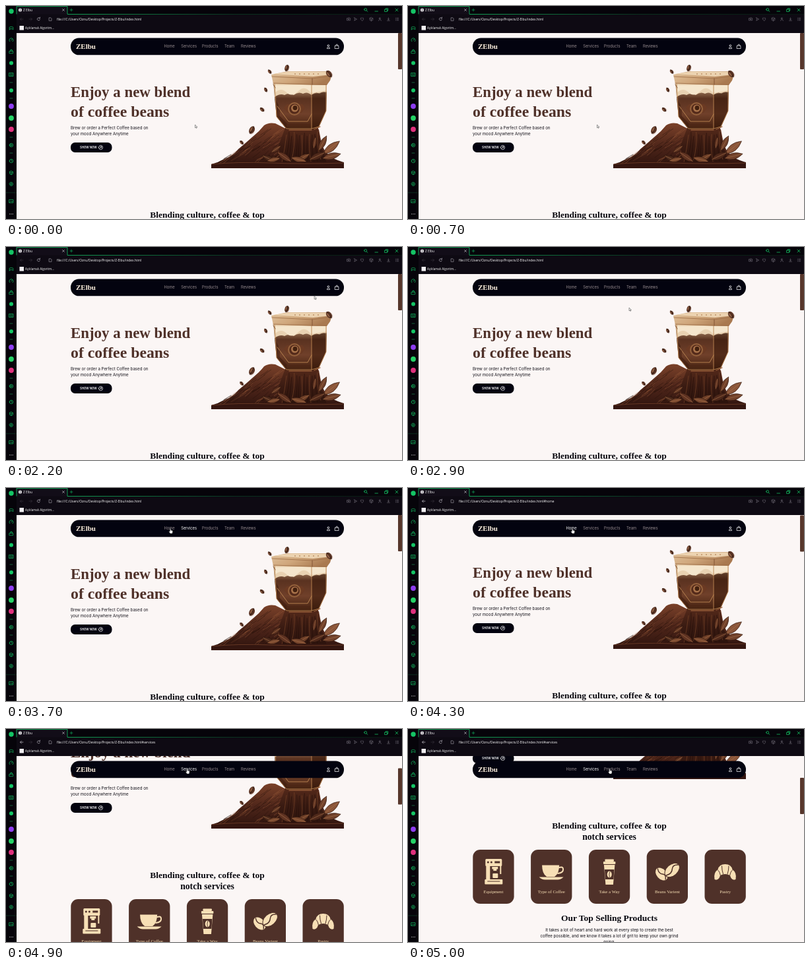
An HTML page for the animation above (5100 ms loop, 600x323 px).

```html
<!DOCTYPE html>
<html lang="en">
<head>
<meta charset="utf-8">
<title>Coffee shop page</title>
<style>
  html, body { margin: 0; width: 100%; height: 100%; overflow: hidden; background: #fbf6f5; }
  svg { display: block; width: 100vw; height: 100vh; }
  text { white-space: pre; }
  .serif { font-family: "Liberation Serif", serif; }
  .bold { font-weight: 700; }
  .sans { font-family: Inter, sans-serif; }
  .ui { font-family: "Open Sans", sans-serif; fill: #fff; }
  .line { fill: none; stroke-linecap: round; stroke-linejoin: round; }
</style>
</head>
<body>
<svg id="stage" viewBox="0 0 600 323" xmlns="http://www.w3.org/2000/svg"></svg>
<script>
const LOOP = 5100, STEP = 100;
const INK = '#03030f', BROWN = '#4f3129', CREAM = '#f7dfb5', GREEN = '#14c565';

let seed = 7;
const rnd = () => (seed = (seed * 16807) % 2147483647) / 2147483647;

const text = (x, y, size, str, cls, attrs = '') =>
  `<text x="${x}" y="${y}" font-size="${size}" class="${cls}" ${attrs}>${str}</text>`;
const path = (d, fill, attrs = '') => `<path d="${d}" fill="${fill}" ${attrs}/>`;
const line = (d, color, w = 0.7, attrs = '') =>
  `<path class="line" d="${d}" stroke="${color}" stroke-width="${w}" ${attrs}/>`;
const rect = (x, y, w, h, fill, r = 0) =>
  `<rect x="${x}" y="${y}" width="${w}" height="${h}" rx="${r}" fill="${fill}"/>`;
const dot = (x, y, r, fill) => `<circle cx="${x}" cy="${y}" r="${r}" fill="${fill}"/>`;
const ring = (x, y, r) => `M${x - r} ${y}a${r} ${r} 0 1 1 ${2 * r} 0a${r} ${r} 0 1 1 ${-2 * r} 0z`;
const box = (x, y, w, h) => `M${x} ${y}h${w}v${h}h${-w}z`;
const at = (x, y, body, more = '') => `<g transform="translate(${x} ${y}) ${more}">${body}</g>`;
const cube = 'M0 -3L2.7 -1.5V1.5L0 3L-2.7 1.5V-1.5zM-2.7 -1.5L0 0L2.7 -1.5M0 0V3';

function gradient(id, stops, dir = 'x2="0" y2="1"') {
  const list = stops.map((c, i) => `<stop offset="${i / (stops.length - 1)}" stop-color="${c}"/>`);
  return `<linearGradient id="${id}" ${dir}>${list.join('')}</linearGradient>`;
}

// Hero illustration
const bean = (x, y, size, turn) => at(x, y,
  `<ellipse cx=".7" cy="1" rx="${size * 0.68}" ry="${size}" fill="#cdb9b0" opacity=".6"/>` +
  `<ellipse rx="${size * 0.66}" ry="${size}" fill="#5a3424"/>` +
  `<ellipse cx="-.8" cy="-.6" rx="${size * 0.3}" ry="${size * 0.6}" fill="#8a5a40"/>` +
  line(`M0 ${-size}Q1.4 0 0 ${size}`, '#24110b', 0.8), `rotate(${turn})`);

const leaf = (x, y, len, turn, fill) => at(x, y,
  path(`M0 0Q${len * 0.45} ${-len * 0.34} ${len} 0Q${len * 0.45} ${len * 0.34} 0 0z`, fill, 'stroke="#32180f" stroke-width=".6"') +
  line(`M1 0H${len - 2}`, '#b27a50', 0.5), `rotate(${turn})`);

function hero() {
  let s = path('M311 246V240Q322 237 331 232Q344 227 352 217Q364 207 374 198Q384 190 391 181Q398 176 408 178L426 187H474L478 208Q484 230 512 237V246z', 'url(#rock)');
  for (let i = 0; i < 80; i++) {
    const x = 334 + rnd() * 90;
    const top = Math.max(182, 242 - (x - 313) * 0.72);
    const y = top + 3 + rnd() * (229 - top);
    s += line(`M${x.toFixed(1)} ${y.toFixed(1)}q-4 ${(1 + rnd() * 4).toFixed(1)} -11 ${(6 + rnd() * 4).toFixed(1)}`,
      i % 3 ? '#26100b' : '#9a5c3a', 0.8, 'opacity=".55"');
  }
  s += path('M423 185H473L477 210L486 238H420L412 214z', 'url(#neck)');
  for (let i = 0; i < 13; i++) {
    s += line(`M${425 + i * 3.9} ${190 + rnd() * 8}q${2 - rnd() * 5} 22 ${i - 7} 42`, i % 3 ? '#220e09' : '#7d4729', 0.9, 'opacity=".7"');
  }
  const leaves = [
    [474, 219, 25, -62, '#6f402a'], [481, 224, 31, -38, '#8a5539'], [480, 231, 28, -14, '#70412b'],
    [466, 216, 18, -80, '#5b301f'], [460, 233, 26, -25, '#4f291b'], [440, 235, 23, -28, '#6d3e27'],
    [432, 236, 26, -145, '#5f3322'], [408, 236, 22, -155, '#4b291b'], [455, 236, 24, -165, '#78472d'],
    [402, 222, 18, -35, '#5f3522'], [396, 235, 20, -12, '#78472d']
  ];
  s += leaves.map(l => leaf(...l)).join('');
  s += path('M311 240Q350 235 400 237Q460 235 512 237V246H311z', '#341610') +
    line('M312 240Q350 236 400 238T511 238', '#6b3b26', 0.9);

  // Hopper
  s += path('M405 117H486L485 159L474 184L464 187H425L410 168z', 'url(#brew)') +
    path('M406 117H486V132Q480 128 475 133Q469 129 463 135Q456 129 450 133Q443 129 436 135Q428 131 422 135Q415 132 407 138z', '#e9d2b2') +
    path('M408 131Q417 123 425 131T443 129T462 132L485 128V120H408z', '#f5e6cd') +
    path('M463 134L486 130L485 159L474 184L464 187z', '#351609', 'opacity=".5"') +
    path('M407 140L413 150V166L425 178V187L410 168z', '#351609', 'opacity=".45"') +
    line('M407 118L410 168L425 186H463V119M463 186L474 183L485 159V120M411 152L428 175H457L463 164', '#bd8753', 0.9) +
    line('M414 157V167L427 180H460', '#4d2515', 1.2) +
    line('M429 188H463M467 187L476 183', '#935a37', 1.3);
  s += path('M421 154l5 -5h23l4 5l-5 8h-21z', '#6b3a23') +
    dot(437, 156, 10, '#93603b') + dot(437, 156, 7.8, '#542a1a') +
    dot(437.5, 155, 5.5, '#a9734a') + dot(438, 154.5, 3.4, '#43210f');
  s += path('M402 104L426 99H489L494 104L491 113L486 120L405 118z', 'url(#lid)') +
    path('M405 103L430 99.500H489L493 104L465 107z', '#ecd3b1') +
    line('M403 107L464 110L493 106M405 117L464 119L486 119', '#9b6b45', 0.8);
  for (let i = 0; i < 6; i++) s += dot(438 + i * 7, 103, 0.9, '#b98b61');
  s += line('M405 119L408 124M464 110V119', '#845535', 1);

  const beans = [[425.5, 94, 4.7, 18], [399.5, 99.5, 3.3, -35], [393.5, 127, 3.3, -25], [489.5, 103, 5.8, -38],
    [388, 157, 3.7, -45], [372.5, 188, 6, 28], [357, 207, 3.2, -42]];
  return s + beans.map(b => bean(...b)).join('');
}

// Service cards
const cardIcons = [
  rect(19, 14, 25, 11, CREAM, 1.5) + rect(20, 25, 6, 20, CREAM) + rect(18, 45, 27, 7.5, CREAM, 1) +
    rect(29, 26, 9, 3.5, CREAM) + rect(31, 29, 5, 3, CREAM) + rect(30, 36, 8, 7, CREAM, 1) + rect(41, 25, 2, 12, CREAM) +
    dot(23, 19, 1.5, BROWN) + dot(28, 19, 1.5, BROWN) + rect(33, 17.5, 8, 3, BROWN) + rect(22, 47.5, 19, 1, BROWN),
  path('M17 23.5h26q0 13 -7 17.5h-12q-7 -4.5 -7 -17.5z', CREAM) +
    line('M43 27q6 -2 6 3t-8 6', CREAM, 2) + path('M12.5 41.5h37q-4 4 -9 4h-19q-5 0 -9 -4z', CREAM),
  rect(24.5, 14.5, 13.5, 3.5, CREAM, 1) + rect(22, 18, 18.5, 4, CREAM, 1) + path('M23 23h16.5l-2.5 30h-11.5z', CREAM) +
    path('M24 30h14.5l-1 15h-12.5z', BROWN) +
    `<ellipse cx="31.3" cy="37.5" rx="3.5" ry="5" fill="${CREAM}"/>` + line('M32 33q-2 4 -.5 9', BROWN, 0.9),
  at(22.5, 37, `<ellipse rx="11" ry="7.5" fill="${CREAM}"/>` + line('M-10 -1Q-3 3 1 -1T10 1', BROWN, 1.4), 'rotate(48)') +
    at(38.5, 31, `<ellipse rx="13" ry="8.5" fill="${CREAM}" stroke="${BROWN}"/>` + line('M-12 0Q-4 4 1 -1T12 0', BROWN, 1.5), 'rotate(-42)'),
  path('M15 45q-2 -10 5 -15q2 -8 11 -8t11 8q7 5 5 15q-4 2 -7 -2q-1 -6 -9 -6t-9 6q-3 4 -7 2z', CREAM) +
    line('M20 31q3 2 4 9M26 25q0 6 2 12M36.5 25q0 6 -2 12M42 31q-3 2 -4 9', BROWN, 1)
];
const cardNames = ['Equipment', 'Type of Coffee', 'Take a Way', 'Beans Varient', 'Pastry'];
const cards = () => cardNames.map((name, i) => at(98.3 + i * 87.8, 353,
  rect(0, 0, 62.3, 82, BROWN, 11) + cardIcons[i] +
  text(31.2, 66, 6.8, name, 'serif', `fill="${CREAM}" text-anchor="middle"`))).join('');

const mid = (y, size, str, cls) => text(305, y, size, str, cls, 'fill="#090910" text-anchor="middle"');

const page = () =>
  text(98, 138, 22.9, 'Enjoy a new blend', 'serif bold', `fill="${BROWN}"`) +
  text(98, 167.5, 23.8, 'of coffee beans', 'serif bold', `fill="${BROWN}"`) +
  text(98, 186.5, 6.15, 'Brew or order a Perfect Coffee based on', 'sans', 'fill="#15131b"') +
  text(98, 195.5, 6.15, 'your mood Anywhere Anytime', 'sans', 'fill="#15131b"') +
  rect(98, 207, 62.5, 15, INK, 6.5) +
  text(112, 216, 4.3, 'SHOW NOW', 'sans', 'fill="#fff" font-weight="600"') +
  line(ring(143.5, 214.5, 3.1) + 'M142.3 215.8L144.8 213.2M142.8 213.2H144.8V215.2', '#fff', 0.7) +
  hero() +
  mid(321, 13.5, 'Blending culture, coffee &amp; top', 'serif bold') +
  mid(337.5, 13.7, 'notch services', 'serif bold') +
  cards() +
  mid(460.5, 13.5, 'Our Top Selling Products', 'serif bold') +
  mid(476.8, 6.1, 'It takes a lot of heart and hard work at every step to create the best', 'sans') +
  mid(486, 6.1, 'coffee possible, and we know it takes a lot of grit to keep your own grind', 'sans') +
  mid(495.2, 6.1, 'going.', 'sans');

// Sticky bar
const links = [['Home', 239.5], ['Services', 265.2], ['Products', 297], ['Team', 331], ['Reviews', 356]];
const bar = () => rect(98, 48.5, 414, 25.8, INK, 12.5) +
  text(106, 65, 11, 'ZElbu', 'serif bold', 'fill="#fbeedd"') +
  links.map(([name, x]) => text(x, 63.3, 5.8, name, 'sans link')).join('') +
  line(ring(488.5, 60, 1.3) + 'M486.4 64.2q0 -2 2.1 -2t2.1 2z', '#fff', 0.7) +
  line('M498.8 60h5l.3 4.5h-5.6zM500 60q0 -2 1.3 -2t1.3 2', '#fff', 0.7);

// Browser frame
function browser() {
  const g = (d, w = 0.75) => line(d, GREEN, w);
  const grey = d => line(d, '#9a95a1', 0.5);
  const gat = (x, y, d) => at(x, y, g(d), 'scale(.92)');
  const small = (x, d) => at(x, 20, grey(d), 'scale(.88)');
  let s = rect(0, 0, 600, 41, '#06040a') + rect(0, 0, 16, 323, '#06040a') + rect(16, 1, 77, 12, '#120d18') +
    rect(16, 12.5, 584, 28.5, '#0e0a13');
  s += rect(93, 12, 507, 0.8, 'url(#edge)') + line('M16 12V.6H93V12', GREEN, 0.8);

  // Side icons
  s += dot(8, 8, 3.7, GREEN) + dot(8, 86.5, 3, GREEN) + dot(8, 128, 3, GREEN) +
    dot(8, 152, 3.9, '#8e3df2') + dot(8, 170, 3.9, '#25d366') + dot(8, 187, 3.9, '#e0307d');
  s += gat(8, 34, 'M-3 2V-1.5Q-3 -2.5 -2 -2.5H2Q3 -2.5 3 -1.5V2L1.5 .7H-1.5z') +
    gat(8, 51.5, 'M-2.5 2.5A3.3 3.3 0 1 1 2.5 2.5M0 .5L1.5 -1.5') +
    gat(8, 69, 'M-3 -.5H3V3H-3zM-1.5 -.5V-2.5H1.5V-.5M0 -3.5V-2.5') +
    gat(8, 104, box(-3.3, -2.7, 6.6, 5.4) + 'M-2 -1H0M-2 1H2M1.5 -1H2') +
    gat(8, 211, ring(0, 0, 3) + 'M-.8 -1.3L1.5 0L-.8 1.3z') +
    gat(8, 235, ring(0, 0, 3) + 'M0 -1.8V0L1.3 .8') + gat(8, 253, cube) +
    gat(8, 270, ring(0, 0, 1.1) + 'M-1.3 -2.8H1.3L3 0L1.3 2.8H-1.3L-3 0z') +
    gat(8, 296, box(-3.2, -2.5, 6.4, 5) + 'M-2.5 1.5L-.5 -.5L1 1L2.5 0');
  s += [116, 140, 199, 223].map(y => line(`M6 ${y}H10`, '#187747', 0.8)).join('') + line('M0 283H15.5', '#0c5a32', 0.5);
  s += [5.7, 8, 10.3].map(x => dot(x, 315.3, 0.6, '#ddd')).join('');

  // Tabs and window buttons
  s += dot(21.5, 6, 2.6, '#f0eef2') + line('M19.5 5H23.5M19.5 7H23.5M21.5 3.6V8.4', '#4b4650', 0.4) +
    text(26, 7.9, 4.85, 'Z Elbu', 'ui') + line('M85.5 4.5L88.5 7.5M88.5 4.5L85.5 7.5', '#d3d0d8', 0.6) +
    g('M97 6H101M99 4V8', 0.6) + g(ring(544.7, 5.3, 1.9) + 'M546.2 6.8L548 8.5') + g('M559 8H563.5') +
    g(box(574, 5, 3.5, 3.5) + 'M575.3 5V3.7H578.8V7.2H577.5') + g('M590 4L594 8M594 4L590 8');

  // Toolbar
  s += line('M26 20H21.5M23.5 18L21.5 20L23.5 22', '#35303c', 0.7, 'id="back"') +
    line('M35 20H39.5M37.5 18L39.5 20L37.5 22', '#35303c', 0.7) +
    line('M51 18.4A2.1 2.1 0 1 0 51.4 20.6M51.5 17V18.7H49.8', '#c5c1cb', 0.6) +
    line('M65.5 17.8H68L69 18.8V22.3H65.5z', '#c5c1cb', 0.5);
  s += text(77, 21.8, 4.85, '', 'ui', 'id="url"');
  s += small(519.3, 'M-2.8 -1.7H-1.3L-.8 -2.5H1.2L1.7 -1.7H2.7V2H-2.8z' + ring(0, 0, 0.9)) +
    small(529.5, 'M-2 -2.5L2.5 0L-2 2.5L-1 0z') +
    small(539.5, 'M0 2.6L-2.5 0Q-3 -2.4 -1.2 -2.4L0 -1.3L1.2 -2.4Q3 -2.4 2.5 0z') +
    small(553.5, cube) + small(566.5, ring(0, -1.4, 1.1) + 'M-2.2 2.5Q-2 .6 0 .6T2.2 2.5') +
    small(579.5, 'M0 -2.5V1M-1.5 -.4L0 1L1.5 -.4M-2.2 2.5H2.2') +
    small(592.5, 'M-2.5 -2H-2M-.5 -2H2.5M-2.5 0H-2M-.5 0H2.5M-2.5 2H-2M-.5 2H2.5');
  return s + rect(20.5, 30, 6.5, 6.5, '#f2f0f3') + text(29, 35, 4.5, 'Açıklamalı Algoritm...', 'ui');
}

const stage = document.getElementById('stage');
stage.innerHTML = '<defs>' +
  gradient('rock', ['#7a4129', '#4f261a', '#2c120d']) + gradient('neck', ['#54291a', '#3a1b12', '#2b120c']) +
  gradient('brew', ['#d5b48c', '#5a3220', '#70402a', '#42200f']) + gradient('edge', [GREEN, '#0a3d24', '#071a11'], 'x2="1" y2="0"') +
  gradient('lid', ['#dfc09a', '#cfa67b', '#a97950'], 'x2="1" y2=".4"') + '</defs>' +
  rect(0, 0, 600, 323, '#fbf6f5') + `<g id="page">${page()}</g>` + bar() +
  '<g id="thumb">' + rect(594, 41, 6, 55, '#57372c', 1) + '</g>' + browser() +
  '<g id="arrow">' + path('M0 0V4.7L1.1 3.7L1.9 5.4L2.7 5L1.9 3.4H3.3z', '#fff', 'stroke="#333" stroke-width=".5"') + '</g>' +
  '<g id="hand">' + path('M-.7 .7Q0 -.5 .7 .7V3L3 3.6Q3.8 3.9 3.6 5L3 8H-.3L-2.2 5Q-2 4 -.7 5z', '#fff', 'stroke="#222" stroke-width=".5"') + '</g>';

// Motion
const cursorKeys = [
  [0, 286.5, 180], [700, 286.5, 180], [1500, 461, 83], [1800, 489, 71], [2100, 486, 72], [2900, 335, 92],
  [3400, 276, 64], [3600, 270, 62], [3700, 249, 61], [4300, 249, 61], [4500, 274.5, 60], [4900, 274.5, 60], [5000, 305.5, 60]
];
const scrollKeys = [[0, 0], [4100, 0], [4200, 2], [4800, 2], [4900, 95], [5000, 170]];

function track(keys, t) {
  const i = keys.findIndex(k => k[0] > t);
  if (i < 0) return keys[keys.length - 1].slice(1);
  const a = keys[i - 1], b = keys[i], p = (t - a[0]) / (b[0] - a[0]);
  return a.slice(1).map((v, n) => v + (b[n + 1] - v) * p);
}

const $ = id => document.getElementById(id);
const move = (id, x, y) => $(id).setAttribute('transform', `translate(${x} ${y})`);
const linkNodes = [...document.querySelectorAll('.link')];
const onLink = (x, y) => y < 69 ? links.findIndex(l => x >= l[1] - 4 && x < l[1] + 27) : -1;
const address = 'file:///C:/Users/Oznu/Desktop/Projects/Z-Elbu/index.html';

function draw(t) {
  const [x, y] = track(cursorKeys, t);
  const [scroll] = track(scrollKeys, t);
  const hand = onLink(x, y) >= 0;
  move('page', 0, -scroll);
  move('thumb', 0, scroll * 0.194);
  move('arrow', x, y);
  move('hand', x, y);
  $('arrow').style.display = hand ? 'none' : '';
  $('hand').style.display = hand ? '' : 'none';
  // Link colour trails the pointer by one step
  const lit = onLink(...track(cursorKeys, Math.max(0, t - STEP)));
  linkNodes.forEach((n, i) => n.setAttribute('fill', i === lit ? '#fff' : '#988d90'));
  $('url').textContent = address + (t < 4200 ? '' : t < 4800 ? '#home' : '#services');
  $('back').setAttribute('stroke', t < 4200 ? '#35303c' : '#c5c1cb');
}

const start = performance.now();
function tick() {
  const t = (performance.now() - start) % LOOP;
  draw(Math.floor(t / STEP) * STEP);
  requestAnimationFrame(tick);
}
tick();
</script>
</body>
</html>
```
